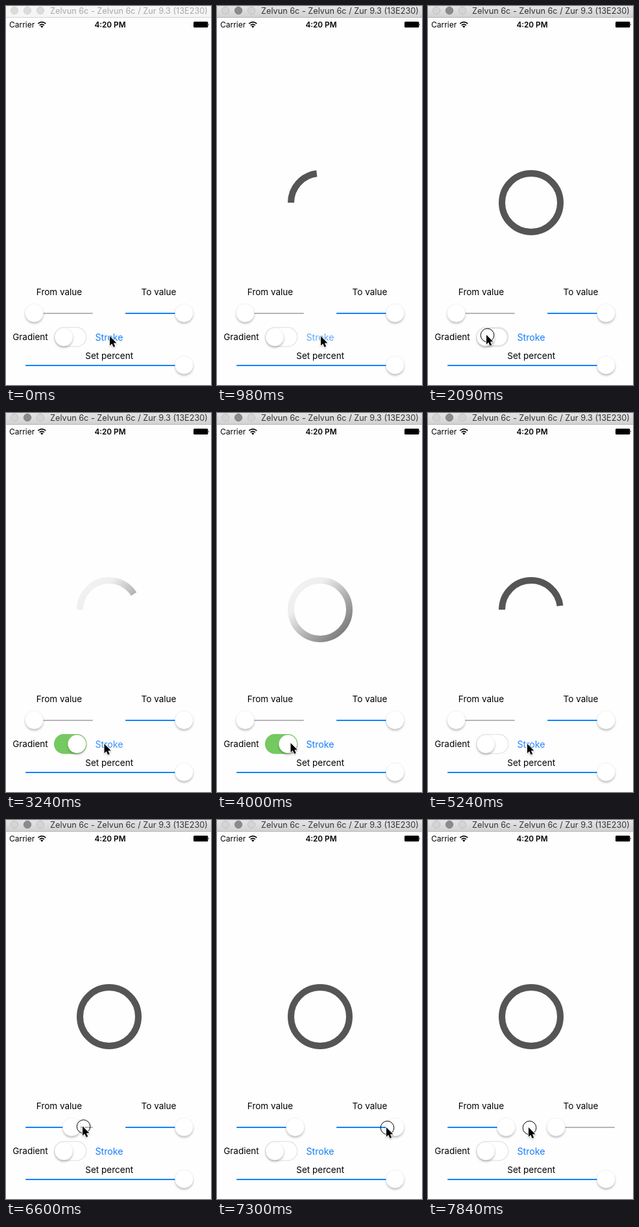
An HTML page for the animation above (8 s loop, 316 px wide and 582 px high).

```html
<!DOCTYPE html>
<html lang="en">
<head>
<meta charset="utf-8">
<title>Stroke demo</title>
<style>
  html, body { margin: 0; width: 100%; height: 100%; overflow: hidden; background: #fefefe; }
  svg { display: block; width: 316px; height: 582px; font-family: Inter, Roboto, sans-serif; }
  .label { font-size: 13.5px; text-anchor: middle; }
  .knob { fill: #fff; stroke: #000; stroke-opacity: .09; stroke-width: .6; filter: url(#shadow); }
  .rail { fill: #b6b6b6; }
  .fill { fill: #1284ff; }
</style>
</head>
<body>
<svg viewBox="0 0 316 582">
  <defs>
    <filter id="shadow" x="-30%" y="-30%" width="160%" height="170%">
      <feDropShadow dx="0" dy="2.4" stdDeviation="1.5" flood-opacity=".25"/>
    </filter>
    <filter id="soft" x="-40%" y="-30%" width="190%" height="170%">
      <feDropShadow dx="0" dy="1" stdDeviation=".8" flood-opacity=".3"/>
    </filter>
    <linearGradient id="shade" gradientUnits="userSpaceOnUse" x1="109" y1="252" x2="209" y2="352">
      <stop offset="0" stop-color="#f5f5f5"/>
      <stop offset=".3" stop-color="#eee"/>
      <stop offset=".6" stop-color="#adadad"/>
      <stop offset="1" stop-color="#626262"/>
    </linearGradient>
    <linearGradient id="chrome" x2="0" y2="1">
      <stop offset="0" stop-color="#e4e4e4"/>
      <stop offset="1" stop-color="#d2d2d2"/>
    </linearGradient>
  </defs>

  <rect width="316" height="582" fill="#fefefe"/>
  <rect id="bar" width="316" height="17"/>
  <rect id="barEdge" y="17" width="316" height="1"/>
  <g id="lights" stroke-width=".8">
    <circle cx="13" cy="7" r="5.7"/>
    <circle id="middleLight" cx="33" cy="7" r="5.7"/>
    <circle cx="53" cy="7" r="5.7"/>
  </g>
  <text id="title" x="68" y="12" font-size="12.7">Zelvun 6c - Zelvun 6c / Zur 9.3 (13E230)</text>

  <text x="5" y="33" font-size="12">Carrier</text>
  <g fill="none" stroke="#000" stroke-width="1.7">
    <path d="M49.3 27.2 Q55.3 21.9 61.3 27.2"/>
    <path d="M51.7 29.6 Q55.3 26.5 58.9 29.6"/>
  </g>
  <path d="M53.1 31.2 Q55.3 29.4 57.5 31.2 L55.3 33.4Z"/>
  <text x="160.5" y="32.5" font-size="11.8" font-weight="600" text-anchor="middle">4:20 PM</text>
  <rect x="289" y="24" width="22.4" height="9" rx="1.6"/>
  <path d="M312.2 27 q1.6 1.5 0 3z"/>

  <path id="arc" d="M114 302 A45 45 0 0 1 204 302 A45 45 0 0 1 114 302" pathLength="1" fill="none" stroke-width="10"/>

  <text class="label" x="82" y="444.3">From value</text>
  <text class="label" x="235.5" y="444.3">To value</text>
  <text class="label" x="37.5" y="513.3">Gradient</text>
  <text id="stroke" class="label" x="159" y="513.5" style="font-size:14.2px" fill="#147efb">Stroke</text>

  <g id="sliders"></g>
  <text class="label" x="159.2" y="542">Set percent</text>

  <rect x="74" y="493" width="50.4" height="30.6" rx="15.3" fill="#e3e3e3"/>
  <rect id="green" x="74" y="493" width="50.4" height="30.6" rx="15.3" fill="#75c961"/>
  <rect id="hole" fill="#fff"/>
  <circle id="toggle" class="knob" cy="508.3" r="14"/>

  <circle id="touch" r="10.3" fill="none" stroke="#000"/>
  <path id="cursor" d="M0 0V14.6L3.3 11.5L5.6 16.8L8.2 15.7L5.9 10.5H10.4Z" stroke="#fff" stroke-width="1.5" paint-order="stroke" filter="url(#soft)"/>
</svg>
<script>
const LOOP = 8000, HOLD = 86;
const $ = id => document.getElementById(id);
const set = (el, attrs) => { for (const k in attrs) el.setAttribute(k, attrs[k]); };
const clamp = (x, lo = 0, hi = 1) => Math.min(hi, Math.max(lo, x));
const ramp = (t, start, length) => clamp((t - start) / length);
const ease = (t, start, length) => {
  const x = ramp(t, start, length);
  return x * x * (3 - 2 * x);
};

// What the user does.
const taps = [{ down: 710, up: 812 }, { down: 2980, up: 3018, shaded: true }, { down: 4970, up: 4985 }];
const switchOn = { down: 2040, up: 2180 };
const switchOff = { down: 4150, up: 4270 };
const dragFrom = { down: 6440, up: 6720 };
const dragTo = { down: 7300, up: LOOP };
const presses = [...taps, switchOn, switchOff, dragFrom, dragTo];

const home = { x: 160, y: 507 };
const moves = [
  { start: 1600, end: 2000, x: 90, y: 505 },
  { start: 2350, end: 2510, x: 151.5, y: 508 },
  { start: 3780, end: 4090, x: 96, y: 506 },
  { start: 4360, end: 4500, x: 124.5, y: 506 },
  { start: 4530, end: 4680, x: 153, y: 508 },
  { start: 5890, end: 6270, x: 47, y: 471 },
  { start: dragFrom.down, end: 6636, x: 134, y: 470 },
  { start: 6800, end: 7110, x: 261, y: 472 },
  { start: dragTo.down, end: 7810, x: 155, y: 472 }
];

// The screen refreshes in holds counted from the start of each burst of activity.
const bursts = [0, 710, 1650, 2980, 3820, 4970, 5930, 6600, 7300];
function held(t) {
  const start = bursts.findLast(b => t >= b);
  return t - (t - start) % HOLD;
}

function pointer(t) {
  return moves.reduce((p, m) => {
    const k = ramp(t, m.start, m.end - m.start);
    return { x: p.x + (m.x - p.x) * k, y: p.y + (m.y - p.y) * k };
  }, home);
}

// A slider knob follows the pointer, slightly late, while it is dragged.
function makeSlider(x, width, y, atEnd, drag) {
  const part = (tag, cls, attrs) => {
    const el = document.createElementNS("http://www.w3.org/2000/svg", tag);
    set(el, { class: cls, ...attrs });
    return $("sliders").appendChild(el);
  };
  const rail = { x, y: y - .3, height: 2, rx: 1 };
  part("rect", "rail", { ...rail, width });
  const fill = part("rect", "fill", rail);
  const knob = part("circle", "knob", { cy: y, r: 14 });
  const min = x + 13.5, max = x + width - 13.5;
  return t => {
    let cx = atEnd ? max : min;
    if (drag) cx += pointer(clamp(t - 30, drag.down, drag.up)).x - pointer(drag.down).x;
    cx = clamp(cx, min, max);
    set(fill, { width: cx - x });
    set(knob, { cx });
  };
}
const sliders = [
  makeSlider(30, 104, 471.3, false, dragFrom),
  makeSlider(184, 104, 471.3, true, dragTo),
  makeSlider(30, 258, 551.2, true)
];

function drawWindow(active) {
  set($("bar"), { fill: active ? "url(#chrome)" : "#f6f6f6" });
  set($("barEdge"), { fill: active ? "#b4b4b4" : "#d4d4d4" });
  set($("title"), { fill: active ? "#333" : "#a8a8a8" });
  set($("lights"), { fill: active ? "#d4d4d4" : "#dcdcdc", stroke: active ? "#bababa" : "#cfcfcf" });
  set($("middleLight"), active ? { fill: "#8b8b8b", stroke: "#787878" } : { fill: "#dcdcdc", stroke: "#cfcfcf" });
}

function drawArc(t) {
  const run = taps.findLast(tap => t >= tap.up);
  const shown = run ? ease(t, run.up, 500) : 0;
  set($("arc"), {
    stroke: run && run.shaded ? "url(#shade)" : "#555",
    "stroke-dasharray": shown < 1 ? `${shown} 2` : "none",
    visibility: shown > 0 ? "visible" : "hidden"
  });
  const tap = taps.findLast(p => t >= p.down);
  set($("stroke"), { opacity: tap ? .2 + .8 * ramp(t, tap.up, 270) : 1 });
}

function drawToggle(t) {
  const slide = ease(t, switchOn.up, 240) - ease(t, switchOff.up, 240);
  const cover = ease(t, switchOn.down, 200) - ease(t, switchOff.up, 300);
  const inset = 1.3 + 14 * cover;
  set($("toggle"), { cx: 89 + 20.4 * slide });
  set($("green"), { opacity: slide });
  set($("hole"), {
    x: 74 + inset, y: 493 + inset, rx: 15.3 - inset,
    width: (50.4 - 2 * inset) * (cover < 1), height: 30.6 - 2 * inset
  });
}

function drawPointer(t) {
  const { x, y } = pointer(t);
  const pressed = presses.some(p => t >= p.down && t < p.up);
  set($("cursor"), { transform: `translate(${x} ${y})` });
  set($("touch"), { cx: x + 1.5, cy: y + .6, visibility: pressed ? "visible" : "hidden" });
}

function render(now) {
  const t = held(now % LOOP);
  drawWindow(t >= taps[0].down);
  drawArc(t);
  drawToggle(t);
  sliders.forEach(draw => draw(t));
  drawPointer(t);
}

const began = performance.now();
function tick() {
  render(performance.now() - began);
  requestAnimationFrame(tick);
}
tick();
</script>
</body>
</html>
```
